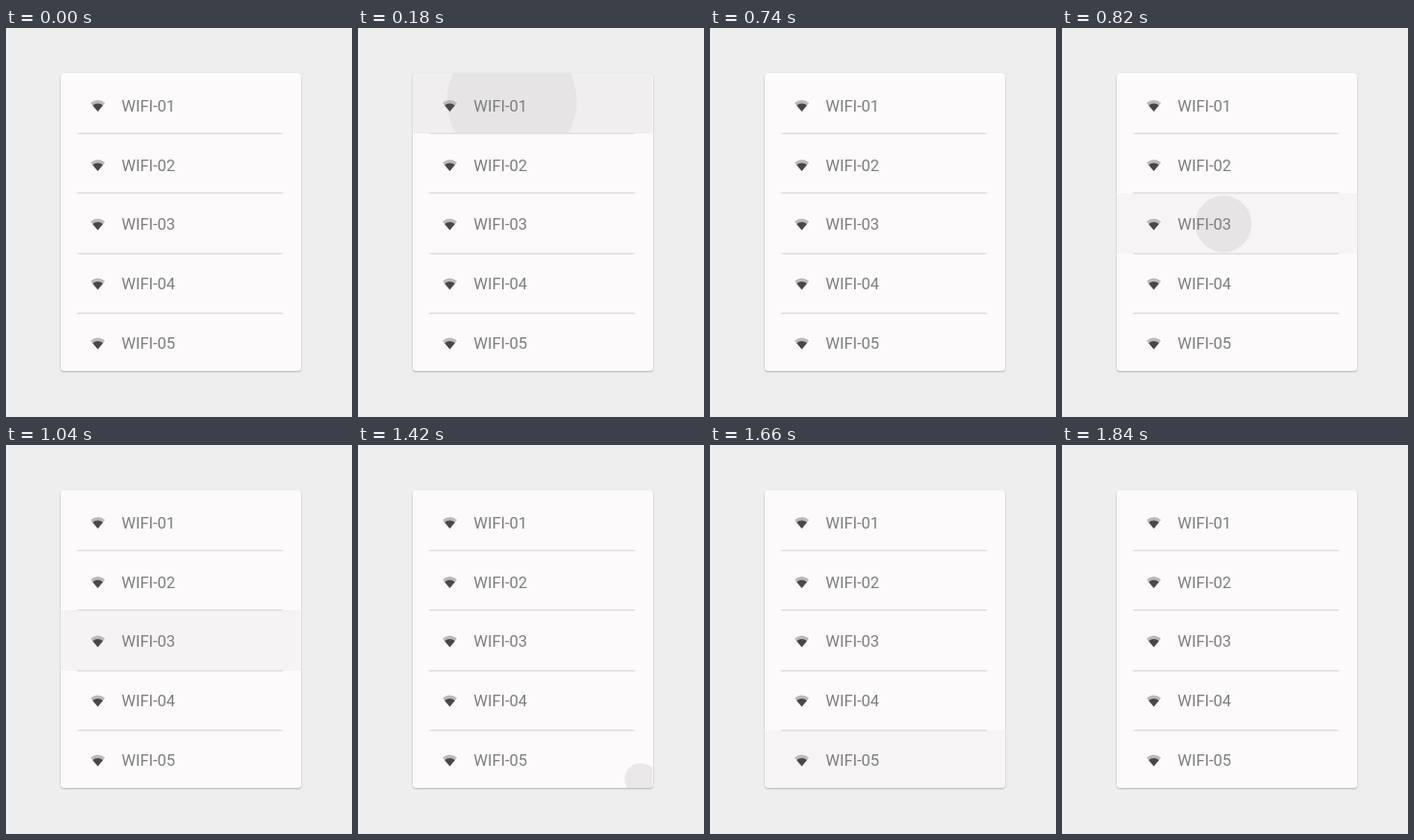
These frames come from a looping animation (360x405 px, 2340 ms). An HTML page:

```html
<!DOCTYPE html>
<html lang="en">
<head>
<meta charset="utf-8">
<title>Wi-Fi list ripple</title>
<style>
  html, body { margin: 0; width: 100%; height: 100%; overflow: hidden; background: #eee; }
  svg { position: absolute; left: 0; top: 0; }
  .card { position: absolute; left: 57px; top: 47px; width: 249.5px; height: 310px; border-radius: 3px;
    background: #fcfafb; box-shadow: 0 1px 2px rgba(0, 0, 0, .24), 0 0 1px rgba(0, 0, 0, .08); }
  text { font: 400 16.5px Roboto, sans-serif; fill: #7e7e7e; }
</style>
</head>
<body>
<div class="card"></div>
<svg id="stage" width="360" height="405" viewBox="0 0 360 405"></svg>
<script>
const LOOP = 2340;
const stage = document.getElementById('stage');
const edges = [47, 110, 172, 235, 297, 357];
const centers = [81, 143, 204.5, 266.5, 328.5];

// Ripple steps: ms after the touch, radius, share of the way to the end point, opacity
const wave = [
  [0, 16, 0, .072],
  [80, 67, .65, .036],
  [120, 90, .96, .014],
  [160, 112, 1, 0]
];
// Row tint steps: ms after the touch, opacity
const tint = [[0, 0], [20, .02], [80, .05], [120, .05], [240, .024], [380, 0]];

const taps = [
  { row: 0, at: 100, from: [160, 76], to: [160, 76] },
  { row: 2, at: 800, from: [168, 204], to: [168, 204] },
  { row: 4, at: 1420, from: [295, 348], to: [166, 327] }
];

function add(tag, attrs, parent = stage) {
  const el = document.createElementNS('http://www.w3.org/2000/svg', tag);
  for (const key in attrs) el.setAttribute(key, attrs[key]);
  parent.append(el);
  return el;
}

function loop(el, steps) {
  const last = steps[steps.length - 1];
  const frames = [
    { ...steps[0], offset: 0, opacity: 0 },
    { ...steps[0], opacity: 0 },
    ...steps,
    { ...last, offset: 1 }
  ];
  const anim = el.animate(frames, { duration: LOOP, iterations: Infinity });
  anim.startTime = 0;
}

const mix = (a, b, k) => a + (b - a) * k;

for (const { row, at, from, to } of taps) {
  const y = edges[row], height = edges[row + 1] - y;
  const clip = add('clipPath', { id: 'row' + row });
  const box = { x: 57, y, width: 249.5, height, rx: row === 2 ? 0 : 2 };
  add('rect', box, clip);
  const group = add('g', { 'clip-path': `url(#row${row})` });

  const shade = add('rect', { ...box, opacity: 0 }, group);
  loop(shade, tint.map(([ms, opacity]) => ({ offset: (at + ms) / LOOP, opacity })));

  const circle = add('circle', { opacity: 0 }, group);
  loop(circle, wave.map(([ms, r, k, opacity]) => ({
    offset: (at + ms) / LOOP,
    cx: mix(from[0], to[0], k) + 'px',
    cy: mix(from[1], to[1], k) + 'px',
    r: r + 'px',
    opacity
  })));
}

for (const y of [109, 171, 234.3, 296.3])
  add('rect', { x: 74, y, width: 214, height: 1.5, fill: '#dfdedf' });

centers.forEach((y, i) => {
  const icon = add('g', { transform: `translate(95.5 ${y})` });
  add('path', { d: 'M0 6L-7.5-3Q0-8.8 7.5-3Z', fill: '#bababa' }, icon);
  add('path', { d: 'M0 6L-5.4-.6Q0-4.6 5.4-.6Z', fill: '#484848' }, icon);
  add('text', { x: 120.3, y: y + 5.8 }).textContent = 'WIFI-0' + (i + 1);
});
</script>
</body>
</html>
```
